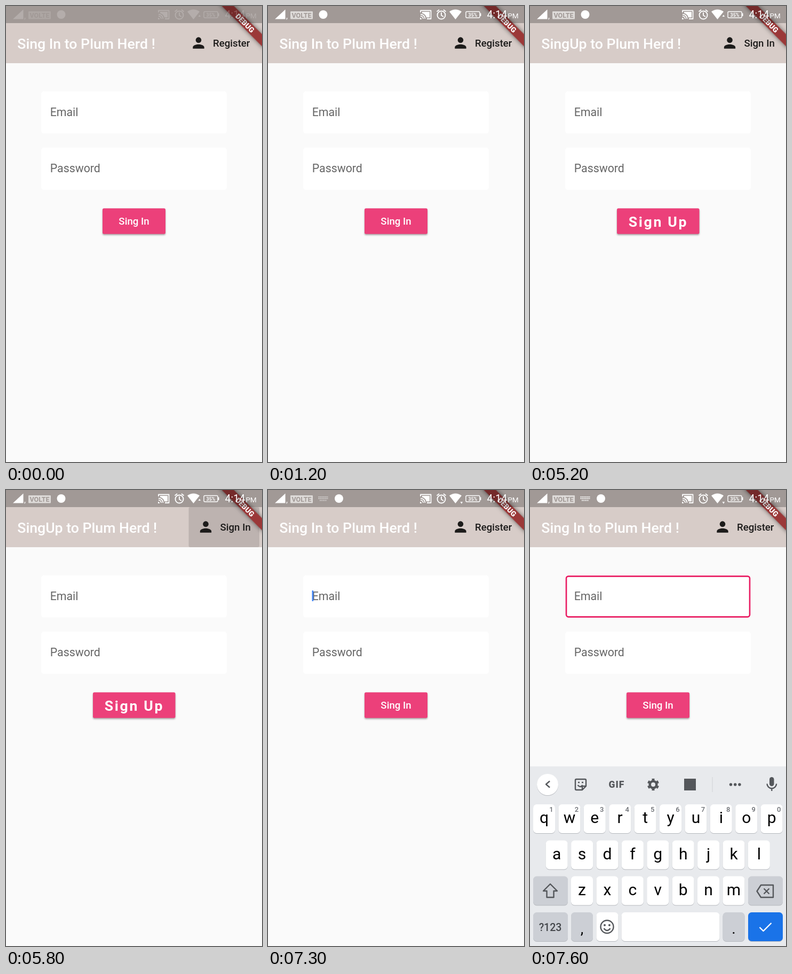
An HTML page for the animation above (8 s loop, 480 by 853 pixels).

```html
<!DOCTYPE html>
<html lang="en">
<head>
<meta charset="utf-8">
<title>Sign-in screen</title>
<style>
  html, body { margin: 0; height: 100%; overflow: hidden; background: #fafafa; }
  svg { display: block; width: 100vw; height: 100vh; font-family: Roboto, sans-serif; }
  .title { font: 500 26.67px Roboto, sans-serif; fill: #fff; }
  .action { font: 500 18.67px Roboto, sans-serif; fill: #1c1b1a; }
  .label { font-size: 21.33px; fill: #666; }
  .button { fill: #ec407a; filter: drop-shadow(0 2px 1.5px #0005); }
  .mid { text-anchor: middle; }
  .line { fill: none; stroke: currentColor; stroke-width: 2.4; stroke-linejoin: round; }
  .key { filter: drop-shadow(0 1.5px 0 #b5b8bd); }
</style>
</head>
<body>
<svg viewBox="0 0 480 853" preserveAspectRatio="none">
  <defs>
    <path id="person" fill="#1c1b1a" transform="scale(1.333)"
      d="M0 0a4 4 0 1 0 0-8a4 4 0 0 0 0 8zm0 2c-2.7 0-8 1.3-8 4v2h16v-2c0-2.7-5.3-4-8-4z"/>
  </defs>
  <rect width="480" height="853" fill="#fafafa"/>
  <rect width="480" height="107" fill="#d7ccc8"/>
  <rect id="press" y="32" height="75" rx="3"/>

  <g id="signIn">
    <text class="title" x="21.3" y="80">Sing In to Plum Herd !</text>
    <use href="#person" transform="translate(361 69)"/>
    <text class="action" x="388" y="76">Register</text>
    <rect class="button" x="181" y="378.5" width="118" height="48" rx="2.7"/>
    <text class="action mid" x="240" y="409" style="fill:#fff">Sing In</text>
  </g>
  <g id="signUp">
    <text class="title" x="21.3" y="80">SingUp to Plum Herd !</text>
    <use href="#person" transform="translate(374.5 69)"/>
    <text class="action" x="401.5" y="76">Sign In</text>
    <rect class="button" x="163" y="378.5" width="154.5" height="48" rx="2.7"/>
    <text x="184.7" y="413" font-size="26.67" font-weight="700" letter-spacing="2.67" fill="#fff">Sign Up</text>
  </g>

  <g fill="#fff">
    <rect x="66" y="159.5" width="348" height="79" rx="5"/>
    <rect x="66" y="265" width="348" height="79" rx="5"/>
  </g>
  <rect id="focus" x="68" y="161.3" width="344" height="76" rx="4" fill="none" stroke="#e91e63" stroke-width="2.7"/>
  <text class="label" x="82.7" y="205.5">Email</text>
  <text class="label" x="82.7" y="310.5">Password</text>
  <rect id="caret" x="82.5" y="188" width="2.7" height="20" fill="#4285f4"/>

  <g transform="translate(480 0) rotate(45)">
    <rect x="-60" y="37.3" width="120" height="16" fill="#9b3838" style="filter:drop-shadow(0 0 4px #0008)"/>
    <text class="mid" y="50" font-size="13.6" font-weight="900" fill="#fff">DEBUG</text>
  </g>
  <rect width="480" height="32" opacity=".25"/>

  <g id="status" fill="#fff" color="#fff">
    <path d="M13 24.500H32.500V6.500z"/>
    <text x="34" y="24" font-size="15">,</text>
    <rect x="42" y="10" width="42" height="14.5" rx="1" fill="#dedbd9"/>
    <text class="mid" x="63" y="22" font-size="12.5" font-weight="700" style="fill:#a19996">VOLTE</text>
    <circle id="dot" cy="16" r="8"/>
    <path id="keysIcon" fill="none" stroke="#fff" stroke-width="2" stroke-dasharray="2 1"
      d="M94.500 13H113M94.500 16H113M97 19.500H110"/>
    <path class="line" style="stroke-width:1.8" d="M286 12V8.500H305.500V24H298M286 15.500a8.500 8.500 0 0 1 8.500 8.500M286 19a5 5 0 0 1 5 5"/>
    <path d="M289 11H303V21.500H297a11 11 0 0 0-8-8zM285 22a3 3 0 0 1 3 3H285z"/>
    <g class="line" style="stroke-width:1.9">
      <circle cx="325" cy="17" r="7.5"/>
      <path d="M325 12V17.500L329 20M316.500 10.500L321 7M333.500 10.500L329 7"/>
    </g>
    <path d="M340 10.500Q351.500 2.500 363 10.500L351.500 25z"/>
    <path id="up" d="M360.500 20L363 16.500L365 20z"/>
    <path id="down" d="M360.500 22L365 22L363 26z"/>
    <rect class="line" style="stroke-width:1.4" x="371" y="10.5" width="26" height="11.5" rx="2"/>
    <rect x="397.5" y="13.5" width="2" height="5.5"/>
    <text class="mid" x="384" y="19.5" font-size="9" font-weight="700">35%</text>
    <text x="410.5" y="23" font-size="19.5">4:14</text>
    <text x="449.5" y="23" font-size="13.5">PM</text>
  </g>

  <g id="keyboard" color="#54575b">
    <rect y="517" width="480" height="350" fill="#e8eaed"/>
    <circle class="key" cx="33" cy="551" r="20" fill="#fff"/>
    <path class="line" d="M37 544.500L30 550.500L37 556.500"/>
    <path class="line" d="M87 541H103a2 2 0 0 1 2 2V554L98 561H87a2 2 0 0 1-2-2V543a2 2 0 0 1 2-2zM105 554H100a2 2 0 0 0-2 2V561M89.500 552q5 6 9 0M90 547h3M97 547h3"/>
    <text class="mid" x="162.5" y="556.5" font-size="17.5" font-weight="900" letter-spacing="1" fill="currentColor">GIF</text>
    <g class="line">
      <circle cx="231" cy="551" r="6.3" style="stroke-width:4.6"/>
      <circle cx="231" cy="551" r="9.6" pathLength="12" stroke-dasharray="1 1" stroke-dashoffset="-.5" style="stroke-width:3.2"/>
    </g>
    <rect x="289" y="540" width="22" height="22" fill="currentColor"/>
    <path d="M342 537V565" stroke="#d0d2d6"/>
    <path d="M376.500 551h17" stroke="currentColor" stroke-width="5.5" stroke-linecap="round" stroke-dasharray="0 8.2"/>
    <rect x="449" y="537" width="8.5" height="17" rx="4.25" fill="currentColor"/>
    <path class="line" d="M444.500 549.500a8.800 8.800 0 0 0 17.600 0M453.300 558.500V563"/>
    <g id="keys"></g>
    <path class="line" d="M38 737L51 750H44.500V762H31.500V750H25z"/>
    <path class="line" d="M433 739H456V762H433L425.500 750.500zM438.500 745.500l10 10m0-10l-10 10"/>
    <g class="line"><circle cx="144.5" cy="817" r="12"/><path d="M138.500 820q6 8 12 0"/></g>
    <path d="M140 814h9" stroke="currentColor" stroke-width="4" stroke-linecap="round" stroke-dasharray="0 8.9"/>
    <path class="line" style="stroke:#fff" d="M430.500 818L437.500 825L452.500 810"/>
  </g>
</svg>
<script>
  const $ = id => document.getElementById(id);
  const GREY = '#cccfd5', WHITE = '#fff', PITCH = 47.4;

  const key = (x, y, w, fill) =>
    `<rect class="key" x="${x}" y="${y}" width="${w}" height="54" rx="6.5" fill="${fill}"/>`;
  const glyph = (x, y, size, text, fill = '#000', weight = 400) =>
    `<text class="mid" x="${x}" y="${y}" font-size="${size}" font-weight="${weight}" fill="${fill}">${text}</text>`;

  let keys = '';
  [['qwertyuiop', 6, 588], ['asdfghjkl', 29.7, 655.5], ['zxcvbnm', 77, 722.5]].forEach(([row, left, y], r) =>
    [...row].forEach((letter, i) => {
      const x = left + i * PITCH;
      keys += key(x, y, 41, WHITE) + glyph(x + 20.5, y + 35, 30, letter);
      if (!r) keys += glyph(x + 34, y + 14, 13, (i + 1) % 10, '#6a6d72', 500);
    }));
  keys += key(6, 722.5, 65, GREY) + key(409, 722.5, 65, GREY)
    + key(6, 790, 65, GREY) + glyph(38, 824.5, 19.5, '?123', '#44474b', 500)
    + key(77, 790, 41, GREY) + glyph(97.5, 830, 28, ',')
    + key(124.4, 790, 41, WHITE) + key(171.5, 790, 184, WHITE)
    + key(361.5, 790, 41, GREY) + glyph(382, 830, 28, '.')
    + key(409, 790, 65, '#1a73e8');
  $('keys').innerHTML = keys;

  const show = (id, on) => $(id).style.display = on ? '' : 'none';
  const set = (id, attrs) => {
    for (const name in attrs) $(id).setAttribute(name, attrs[name]);
  };

  function draw() {
    const t = performance.now() % 8000;
    const within = (from, to) => t >= from && t < to;

    // Each press tints the app bar button before the form swaps
    const signUp = within(1600, 6000);
    const left = signUp ? 342.5 : 329;
    show('signUp', signUp);
    show('signIn', !signUp);
    show('press', within(1500, 1600) || within(5800, 6200));
    set('press', { x: left, width: 475 - left, opacity: t < 6000 ? .12 : .06 });

    // The status icons fade in by steps
    set('status', { opacity: Math.min(1, .2 + .3 * Math.floor(t / 100)) });
    show('up', t < 1200 || within(5200, 6200));
    show('down', within(2200, 5200) || t >= 6200);

    set('dot', { cx: t < 7200 ? 103.5 : t < 7300 ? 118 : 133 });
    set('keysIcon', { opacity: t < 7300 ? 0 : t < 7500 ? .5 : .9 });
    show('caret', within(7200, 7600));
    show('focus', t >= 7500);
    show('keyboard', t >= 7500);
    const rising = t < 7600;
    set('keyboard', { transform: `translate(0 ${rising ? 12 : 0})`, opacity: rising ? .87 : 1 });
    requestAnimationFrame(draw);
  }
  draw();
</script>
</body>
</html>
```
